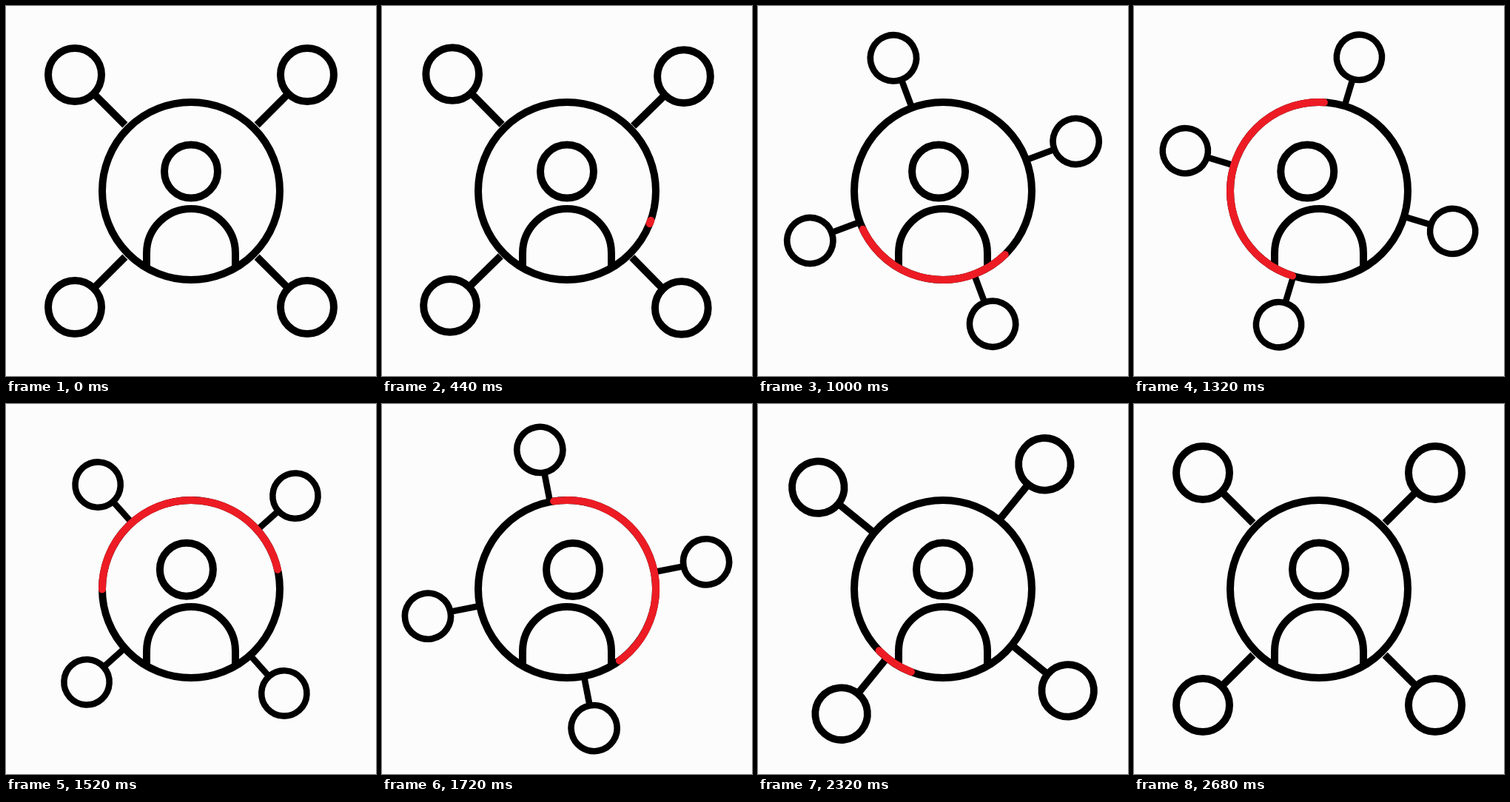
An HTML page that plays this animation: 500 by 500 pixels, repeating every 2920 ms.

```html
<!DOCTYPE html>
<html lang="en">
<head>
<meta charset="utf-8">
<title>Network</title>
<style>
  html, body { margin: 0; height: 100%; overflow: hidden; background: #fcfcfc; }
  svg { display: block; width: 100vw; height: 100vh; }
</style>
</head>
<body>
<svg viewBox="0 0 500 500" fill="none" stroke="#000" stroke-width="10">
  <defs>
    <g id="node">
      <path d="M126 0H187"/>
      <circle cx="222" r="36"/>
    </g>
  </defs>
  <g id="nodes">
    <use href="#node" transform="rotate(45)"/>
    <use href="#node" transform="rotate(135)"/>
    <use href="#node" transform="rotate(225)"/>
    <use href="#node" transform="rotate(315)"/>
  </g>
  <circle cx="250" cy="250" r="120" fill="#fcfcfc"/>
  <path d="M190 352V334A60 60 0 0 1 310 334V352"/>
  <circle id="head" cx="250" cy="223.5" r="36"/>
  <path id="arc" stroke="#ed1c24" stroke-linecap="round"/>
</svg>
<script>
const LOOP = 2920, STEP = 40, START = 320, END = 2680;
const nodes = document.getElementById('nodes');
const head = document.getElementById('head');
const arc = document.getElementById('arc');

// Eased progress from time a to time b, cubic-bezier(.53, 0, .47, 1)
function ease(t, a, b) {
  const x = Math.min(1, Math.max(0, (t - a) / (b - a)));
  let lo = 0, hi = 1;
  for (let i = 0; i < 24; i++) {
    const u = (lo + hi) / 2, v = 1 - u;
    if (1.59 * u * v * v + 1.41 * u * u * v + u * u * u < x) lo = u; else hi = u;
  }
  return lo * lo * (3 - 2 * lo);
}

// Smooth curve through the values at the shared arc times, at rest at both ends
const times = [START, 680, 1000, 1320, 1720, 2040, 2320, END];
const leadAngles = [19, 49.4, 154.5, 273.3, 413.8, 477.8, 496, 501];
const tailAngles = [19, 24.4, 45.7, 107.4, 261.4, 390.6, 471, 501];

function spline(values, t) {
  const last = times.length - 1;
  const slope = k => k === 0 || k === last ? 0
    : (values[k + 1] - values[k - 1]) / (times[k + 1] - times[k - 1]);
  let i = 0;
  while (i < last - 1 && t >= times[i + 1]) i++;
  const d = times[i + 1] - times[i], u = (t - times[i]) / d, v = 1 - u;
  return values[i] * v * v * (1 + 2 * u) + values[i + 1] * u * u * (3 - 2 * u)
    + d * u * v * (slope(i) * v - slope(i + 1) * u);
}

function arcPath(from, to) {
  const point = deg => {
    const a = deg * Math.PI / 180;
    return `${250 + 120 * Math.cos(a)} ${250 + 120 * Math.sin(a)}`;
  };
  const large = to - from > 180 ? 1 : 0;
  return `M${point(from)}A120 120 0 ${large} 1 ${point(to)}`;
}

function draw(t) {
  const turn = 180 * ease(t, START, END);
  const scale = 1 - 0.15 * (ease(t, START, 1220) - ease(t, 1420, END));
  nodes.setAttribute('transform', `translate(250 250) rotate(${turn}) scale(${scale})`);

  const left = ease(t, 790, 1270), right = ease(t, 1270, 1830), back = ease(t, 1830, 2310);
  const x = -16 * left + 25.5 * right - 9.5 * back;
  const y = 0.5 * (right - back) - 1.9 * Math.sin(Math.PI * back);
  head.setAttribute('transform', `translate(${x} ${y})`);

  const running = t > START && t < END;
  arc.setAttribute('d', running
    ? arcPath(spline(tailAngles, t), spline(leadAngles, t) + 0.01) : '');
}

function tick() {
  draw(Math.floor(performance.now() % LOOP / STEP) * STEP);
  requestAnimationFrame(tick);
}
tick();
</script>
</body>
</html>
```
